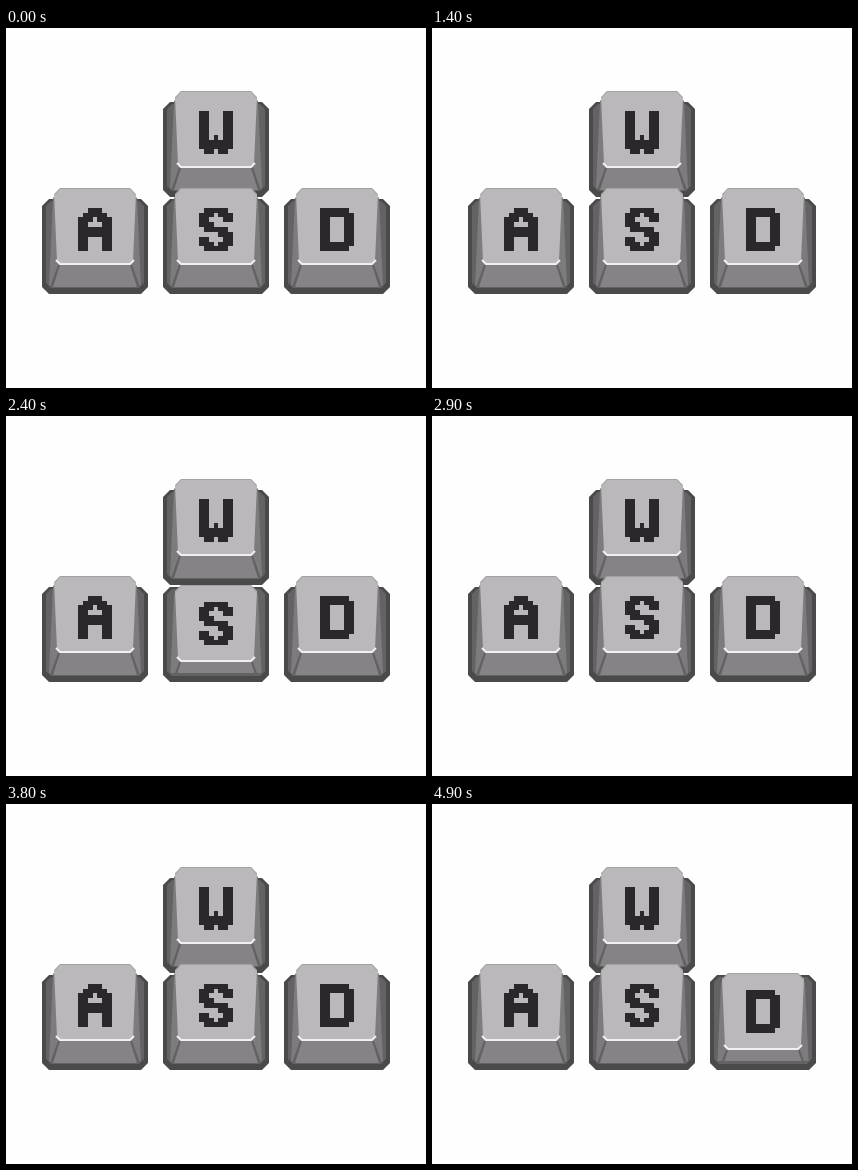
Write an HTML page with a canvas that moves like this. It is 420 by 360 pixels and loops after 5 s.

```html
<!DOCTYPE html>
<html lang="en">
<head>
<meta charset="utf-8">
<title>WASD keys</title>
<style>
  html, body { margin: 0; width: 100%; height: 100%; overflow: hidden; background: #fefefe; }
  canvas { display: block; }
</style>
</head>
<body>
<canvas id="stage" width="420" height="360"></canvas>
<script>
const ctx = document.getElementById('stage').getContext('2d');
const LOOP = 5000, SIZE = 106, DOT = 4.82, CAP_TRAVEL = 9, GLYPH_TRAVEL = 6;

// A glyph tells whether a dot is inked: row 0-8, column 0-6, side = distance from the middle column.
const glyphs = {
  W: (row, col, side) => row === 8 ? side === 1 || side === 2
    : side > 1 || row > 5 || (row === 5 && side === 0),
  A: (row, col, side) => row < 2 ? side < 2 + row
    : side > 1 || row === 4 || row === 5 || (row === 2 && side > 0),
  S: (row, col, side) => row % 4 === 0 ? side < 3
    : row === 3 ? col < 3
    : row === 5 ? col > 3
    : side > (row % 2 ? 0 : 1),
  D: (row, col) => row % 8 === 0 ? col < 6
    : col < 2 || col > 4 || row === 1 || row === 7
};

// Presses are [down, up] times in ms.
const keys = [
  { letter: 'W', col: 1, row: 0, presses: [[900, 1400], [1700, 1800], [1900, 2100]] },
  { letter: 'A', col: 0, row: 1, presses: [[3100, 3800]] },
  { letter: 'S', col: 1, row: 1, presses: [[2400, 2900]] },
  { letter: 'D', col: 2, row: 1, presses: [[3900, 4100], [4200, 4400], [4700, LOOP]] }
];

// Traces left-hand points and their mirror image on the right.
function traceMirrored(left) {
  const right = left.map(([x, y]) => [SIZE - x, y]).reverse();
  ctx.beginPath();
  [...left, ...right].forEach(([x, y]) => ctx.lineTo(x, y));
}

// A symmetric slab with cut corners; its sides slant from topInset to bottomInset.
function slab(color, top, bottom, topInset, bottomInset, topCut = 0, bottomCut = 0) {
  traceMirrored([
    [bottomInset + bottomCut, bottom], [bottomInset, bottom - bottomCut],
    [topInset, top + topCut], [topInset + topCut, top]
  ]);
  ctx.fillStyle = color;
  ctx.fill();
}

function edge(color, width, ...left) {
  traceMirrored(left);
  ctx.strokeStyle = color;
  ctx.lineWidth = width;
  ctx.stroke();
}

function drawBase() {
  slab('#4b4a4b', 11, SIZE, 0, 0, 7, 7);
  slab('#646264', 13, 100, 4, 4, 5, 5);
}

function drawCap() {
  slab('#7d7b7d', 6, 99, 11, 7, 4, 2);
  slab('#636163', 77, 99, 16, 8);
  slab('#858385', 77, 99, 18, 11);
  slab('#bab8ba', 0, 76, 12, 15, 6, 3);
  edge('#a3a1a3', 1, [12.5, 7], [18, 0.5]);
  edge('#f1eff1', 2, [14, 72], [18, 76]);
}

function drawGlyph(letter) {
  const left = (SIZE - 7 * DOT) / 2, top = 19.8;
  const snap = (start, index) => Math.round(start + index * DOT);
  ctx.fillStyle = '#2a282a';
  for (let row = 0; row < 9; row++) {
    for (let col = 0; col < 7; col++) {
      if (!glyphs[letter](row, col, Math.abs(col - 3))) continue;
      const x = snap(left, col), y = snap(top, row);
      ctx.fillRect(x, y, snap(left, col + 1) - x, snap(top, row + 1) - y);
    }
  }
}

function drawKey({ letter, col, row, presses }, time) {
  const pressed = presses.some(([down, up]) => time >= down && time < up);
  ctx.save();
  ctx.translate(Math.round(36.4 + col * 120.6), 63 + row * 97);
  drawBase();

  ctx.save();
  ctx.beginPath();
  ctx.rect(0, 0, SIZE, pressed ? 97 : SIZE);
  ctx.clip();
  ctx.translate(0, pressed ? CAP_TRAVEL : 0);
  drawCap();
  ctx.restore();

  ctx.translate(0, pressed ? GLYPH_TRAVEL : 0);
  drawGlyph(letter);
  ctx.restore();
}

function frame() {
  const time = performance.now() % LOOP;
  ctx.fillStyle = '#fefefe';
  ctx.fillRect(0, 0, 420, 360);
  keys.forEach(key => drawKey(key, time));
  requestAnimationFrame(frame);
}
frame();
</script>
</body>
</html>
```
